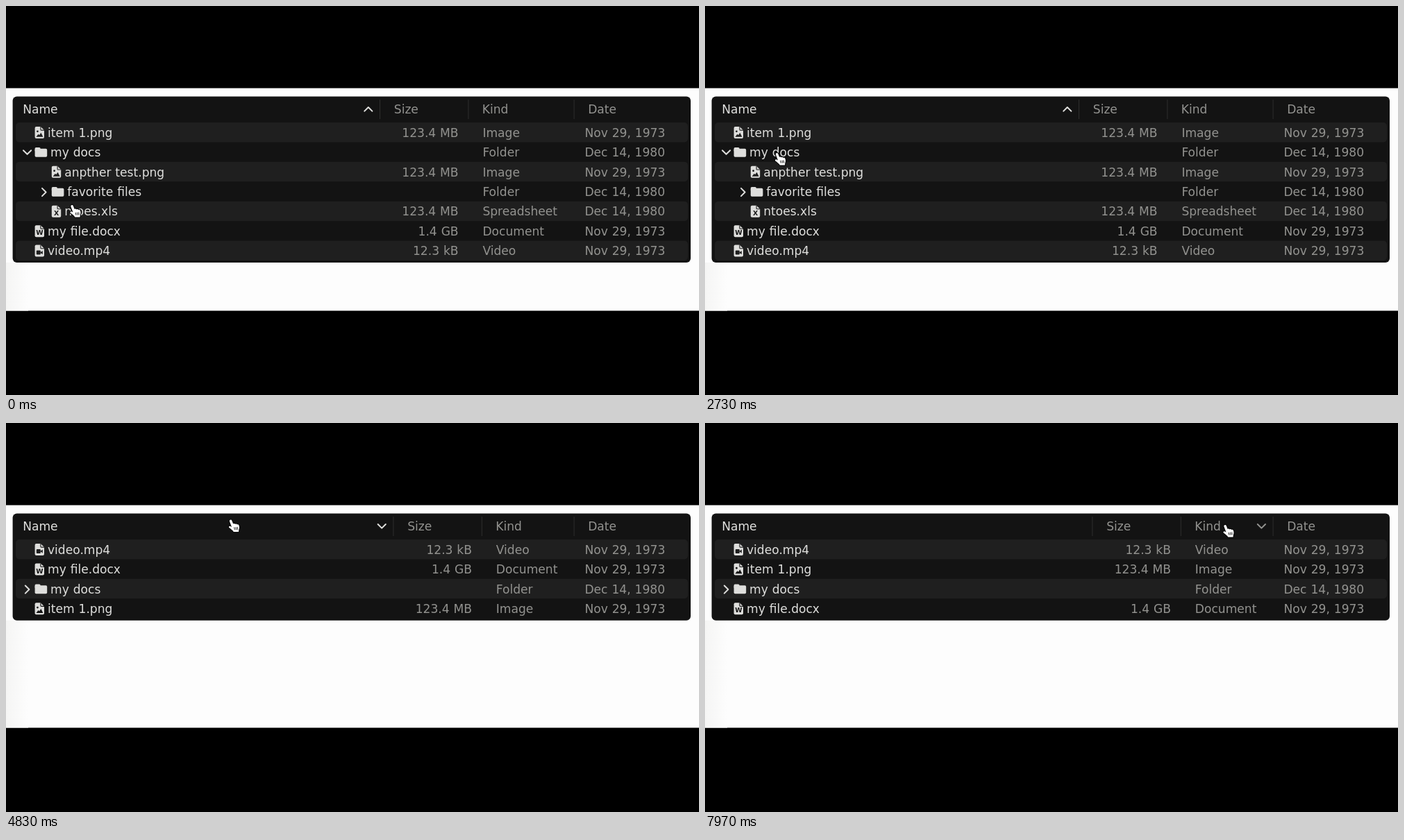
An HTML page with a canvas that plays this animation: 998x561 px, repeating every 8 s.

```html
<!DOCTYPE html>
<html lang="en">
<head>
<meta charset="utf-8">
<title>File list</title>
<style>
  html, body { margin: 0; width: 100%; height: 100%; overflow: hidden; background: #000; }
  canvas { display: block; width: 998px; height: 561px; }
</style>
</head>
<body>
<canvas id="stage" width="998" height="561"></canvas>
<script>
const ctx = document.getElementById("stage").getContext("2d");
const LOOP = 8000;
const FONT = '17.1px "DejaVu Sans", Verdana, sans-serif';
const BASE = "#131313", STRIPE = "#1f1f1f", LINE = "#2e2e2d";
const BRIGHT = "#dededc", MUTED = "#92928f";
const ROW_H = 28.43, FIRST_ROW = 182.4, INDENT = 24.2;

const NOV = "Nov 29, 1973", DEC = "Dec 14, 1980";
const file = (name, icon, size, bytes, kind, date) => ({ name, icon, size, bytes, kind, date });
const folder = (name, id, children) =>
  ({ name, id, children, icon: "folder", size: "", bytes: -1, kind: "Folder", date: DEC });

const tree = [
  file("item 1.png", "image", "123.4 MB", 123.4e6, "Image", NOV),
  folder("my docs", "docs", [
    file("anpther test.png", "image", "123.4 MB", 123.4e6, "Image", NOV),
    folder("favorite files", "favorites", [
      file("my presentation.ppt", "P", "123.4 MB", 123.4e6, "Slide deck", NOV),
      file("velintor cheat codes.txt", "", "123.9 MB", 123.9e6, "File", DEC)
    ]),
    file("ntoes.xls", "X", "123.4 MB", 123.4e6, "Spreadsheet", DEC)
  ]),
  file("my file.docx", "W", "1.4 GB", 1.4e9, "Document", NOV),
  file("video.mp4", "video", "12.3 kB", 12.3e3, "Video", NOV)
];

// Folder arrows turn slightly before the rows appear or go.
const spans = {
  docs: { arrow: [0, 2890], rows: [0, 2930] },
  favorites: { arrow: [470, 2030], rows: [500, 2070] }
};
const sorts = [
  [0, "name", 1], [3770, "name", -1],
  [5470, "bytes", 1], [6070, "bytes", -1],
  [7130, "kind", 1], [7670, "kind", -1]
];
// Pointer stops: time, left, top.
const stops = [
  [0, 91.5, 286], [330, 92, 268], [900, 92, 268], [1250, 104, 292], [1650, 94, 270],
  [1900, 91.5, 268], [2200, 91.5, 268], [2700, 100, 211], [2970, 100, 211],
  [3400, 290, 135], [3530, 295, 135.5], [3950, 312, 138], [4300, 320, 138.5],
  [4830, 320, 138.5], [5000, 402, 141], [5300, 582, 143], [5700, 584, 145],
  [6150, 585, 148], [6530, 587, 159], [6680, 592, 158], [7030, 741, 146],
  [7500, 743, 145], [7800, 745.5, 146], [8000, 745.5, 146]
];

const during = ([from, to], t) => t >= from && t < to;
const ease = p => p * p * (3 - 2 * p);

function pointerAt(t) {
  const i = stops.findIndex((s, k) => k > 0 && t < s[0]);
  const [t0, x0, y0] = stops[i - 1], [t1, x1, y1] = stops[i];
  const p = ease((t - t0) / (t1 - t0));
  return [x0 + (x1 - x0) * p, y0 + (y1 - y0) * p];
}

function listRows(items, key, dir, t, depth = 0) {
  const sorted = [...items].sort((a, b) => dir * (a[key] > b[key] ? 1 : -1));
  return sorted.flatMap(item => {
    const open = item.children && during(spans[item.id].rows, t);
    return [{ item, depth }, ...(open ? listRows(item.children, key, dir, t, depth + 1) : [])];
  });
}

function box(x, y, w, h, r, color) {
  ctx.fillStyle = color;
  ctx.beginPath();
  ctx.roundRect(x, y, w, h, r);
  ctx.fill();
}

function shape(points, color) {
  ctx.fillStyle = color;
  ctx.beginPath();
  points.forEach(([x, y]) => ctx.lineTo(x, y));
  ctx.closePath();
  ctx.fill();
}

function text(str, x, y, color, align = "left") {
  ctx.fillStyle = color;
  ctx.textAlign = align;
  ctx.fillText(str, x, y);
}

function chevron(x, y, turn, color = BRIGHT) {
  ctx.save();
  ctx.translate(x, y);
  ctx.rotate(turn);
  ctx.beginPath();
  ctx.moveTo(-5.6, -2.8);
  ctx.lineTo(0, 2.8);
  ctx.lineTo(5.6, -2.8);
  ctx.strokeStyle = color;
  ctx.lineWidth = 2;
  ctx.lineCap = ctx.lineJoin = "round";
  ctx.stroke();
  ctx.restore();
}

function folderIcon(x, y) {
  box(x, y - 6.8, 8, 6, 1.6, BRIGHT);
  box(x, y - 5, 17.6, 12, 1.8, BRIGHT);
}

function fileIcon(x, y, glyph, back) {
  ctx.save();
  ctx.translate(x, y - 8.4);
  ctx.fillStyle = BRIGHT;
  ctx.fill(new Path2D("M2 0H8.3L13.4 5.1V15Q13.4 17 11.4 17H2Q0 17 0 15V2Q0 0 2 0Z"));
  ctx.strokeStyle = back;
  ctx.lineWidth = 1.1;
  ctx.stroke(new Path2D("M8.3 0V4.3Q8.3 5.1 9.1 5.1H13.4"));
  if (glyph === "image") {
    box(2.4, 5.4, 2.8, 2.8, 1.4, back);
    shape([[1.8, 14.8], [5, 10.8], [6.4, 12.2], [8.8, 8.8], [11.8, 14.8]], back);
  } else if (glyph === "video") {
    box(2.2, 8, 6, 6, 1, back);
    shape([[8.2, 10.4], [11.2, 8.6], [11.2, 13.4], [8.2, 11.6]], back);
  } else if (glyph) {
    ctx.font = 'bold 9.4px "DejaVu Sans", sans-serif';
    text(glyph, 6.7, 14.2, back, "center");
  }
  ctx.restore();
}

function drawRow({ item, depth }, i, shift, t) {
  const y = FIRST_ROW + i * ROW_H, base = y + 6.3;
  const left = 41.6 + depth * INDENT;
  const back = i % 2 ? BASE : STRIPE;
  if (i % 2 === 0) box(14, y - 14.4, 968, ROW_H, 5, STRIPE);
  if (item.children) {
    const open = during(spans[item.id].arrow, t);
    chevron(left - 11, y + (open ? 0.2 : 0.8), open ? 0 : -Math.PI / 2);
    folderIcon(left, y);
  } else {
    fileIcon(left, y, item.icon, back);
  }
  text(item.name, left + (item.children ? 22.4 : 18.4), base, BRIGHT);
  text(item.size, 651.6 + shift, base, MUTED, "right");
  text(item.kind, 686.4 + shift, base, MUTED);
  text(item.date, 833.4, base, MUTED);
}

function drawHeader(key, dir, shift) {
  const base = 155.3;
  text("Name", 24.2, base, BRIGHT);
  text("Size", 558.8 + shift, base, MUTED);
  text("Kind", 685.8 + shift, base, MUTED);
  text("Date", 838.2, base, MUTED);
  ctx.fillStyle = LINE;
  for (const x of [538 + shift, 665.4 + shift, 817.6]) ctx.fillRect(x, 135, 1, 28);
  const arrowX = { name: 521.8 + shift, bytes: 649 + shift, kind: 801.4 }[key];
  chevron(arrowX, 148.8, dir > 0 ? Math.PI : 0, key === "name" ? BRIGHT : MUTED);
}

const hand = new Path2D("M2.2 1.6C3.2 .4 4.8 .8 5.3 2.2L7.2 7C8 6.2 9.6 6.4 10 7.4" +
  "C11 6.6 12.4 7 12.8 8C14 7.4 15.2 8 15.5 9.3C16.2 11.6 16.2 13.2 15.4 15L15 18.5H7.8" +
  "C7 16.5 4.2 14.6 1.4 12.4C.2 11.2 1.4 9.8 2.8 10.2L5 11.4L2 3.6Q1.5 2.4 2.2 1.6Z");
const creases = new Path2D("M8.6 11.8L9.4 15.6M11 11.6L11.6 15.6M13.2 11.4L13.6 15.4");

function drawPointer(t) {
  ctx.save();
  ctx.translate(...pointerAt(t));
  ctx.strokeStyle = "#0a0a0a";
  ctx.lineJoin = "round";
  ctx.lineWidth = 2.4;
  ctx.stroke(hand);
  ctx.fillStyle = "#fff";
  ctx.fill(hand);
  ctx.lineWidth = 0.9;
  ctx.stroke(creases);
  ctx.restore();
}

function drawPage(bottom) {
  ctx.fillStyle = "#000";
  ctx.fillRect(0, 0, 998, 561);
  ctx.fillStyle = "#fdfdfd";
  ctx.fillRect(0, 118.5, 998, 321);
  const shade = ctx.createLinearGradient(0, 0, 32, 0);
  shade.addColorStop(0, "#f5f5f4");
  shade.addColorStop(1, "#fdfdfd");
  ctx.fillStyle = shade;
  ctx.fillRect(0, bottom, 32, 439.5 - bottom);
  box(9.6, 130.6, 976.4, bottom - 130.6, 6, BASE);
}

function draw(t) {
  const [, key, dir] = sorts.filter(s => s[0] <= t).pop();
  const rows = listRows(tree, key, dir, t);
  const shift = during(spans.docs.rows, t) ? 0 : 19.4;
  drawPage(FIRST_ROW + rows.length * ROW_H - 11.4);
  ctx.font = FONT;
  ctx.wordSpacing = "0.5px";
  drawHeader(key, dir, shift);
  rows.forEach((row, i) => drawRow(row, i, shift, t));
  drawPointer(t);
}

const start = performance.now();
function tick() {
  draw((performance.now() - start) % LOOP);
  requestAnimationFrame(tick);
}
tick();
</script>
</body>
</html>
```
